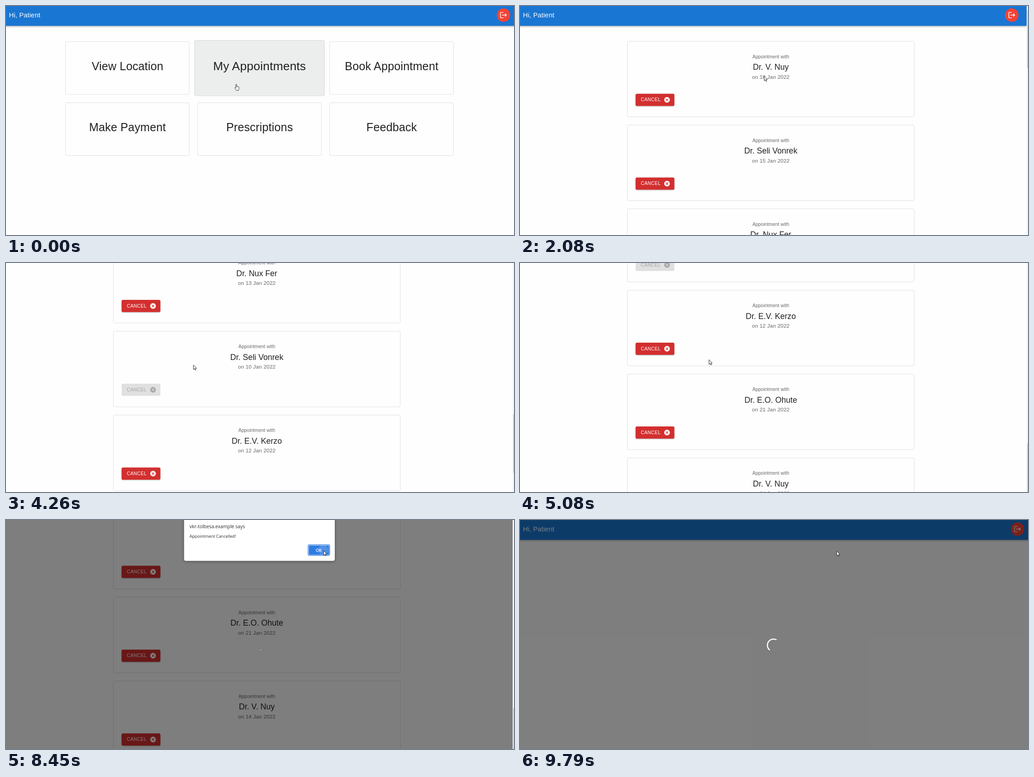
These frames come from a looping animation (1114x503 px, 9860 ms). An HTML page:

```html
<!DOCTYPE html>
<html lang="en">
<head>
<meta charset="utf-8">
<title>Patient appointments</title>
<style>
  html, body { margin: 0; width: 100%; height: 100%; overflow: hidden; background: #fefefe; }
  svg { display: block; position: absolute; left: 0; top: 0; }
  text { font-family: "Liberation Sans", Arial, sans-serif; fill: rgba(0,0,0,.87); white-space: pre; }
  .mid { text-anchor: middle; }
  .h4 { font-size: 24.93px; letter-spacing: .00735em; }
  .h5 { font-size: 17.6px; }
  .h6 { font-size: 14.67px; letter-spacing: .0075em; fill: #fff; }
  .label { font-size: 10.27px; letter-spacing: .01071em; fill: rgba(0,0,0,.6); }
  .date { font-size: 11.73px; letter-spacing: .00938em; fill: rgba(0,0,0,.6); }
  .btn { font-size: 10.27px; letter-spacing: .02857em; fill: #fff; }
  .off .btn, .off .icon { fill: rgba(0,0,0,.26); }
  .card { fill: #fefefe; stroke: rgba(0,0,0,.12); }
  .face { fill: #d32f2f; filter: drop-shadow(0 1.2px 1.2px rgba(0,0,0,.3)); }
  .off .face { fill: #e0e0e0; filter: none; }
  .icon { fill: #fff; }
  .bar { fill: #1976d2; filter: drop-shadow(0 1.5px 2.2px rgba(0,0,0,.4)); }
  .box { fill: #fff; filter: drop-shadow(0 1px 3px rgba(0,0,0,.4)); }
  #dialog text { font-family: "Open Sans", "Noto Sans", sans-serif; fill: #2a2b2e; }
  #dialog .ok { font-size: 9.2px; font-weight: 600; fill: #fff; }
</style>
</head>
<body>
<svg id="stage" width="1114" height="503" viewBox="0 0 1114 503">
  <defs>
    <path id="logout" d="m17 7-1.41 1.41L18.17 11H8v2h10.17l-2.58 2.58L17 17l5-5zM4 5h8V3H4c-1.1 0-2 .9-2 2v14c0 1.1.9 2 2 2h8v-2H4V5z"/>
    <path id="cross" d="M12 2C6.47 2 2 6.47 2 12s4.47 10 10 10 10-4.47 10-10S17.53 2 12 2zm5 13.59L15.59 17 12 13.41 8.41 17 7 15.59 10.59 12 7 8.41 8.41 7 12 10.59 15.59 7 17 8.41 13.41 12 17 15.59z"/>
    <clipPath id="btnClip"><rect x="253.5" y="115.2" width="85" height="26.7" rx="3"/></clipPath>
    <clipPath id="okClip"><rect x="664" y="56" width="44.5" height="20.5" rx="2"/></clipPath>
  </defs>
  <rect width="1114" height="503" fill="#fefefe"/>

  <g id="page">
    <g id="home"></g>
    <g id="list"></g>
    <g id="header">
      <rect class="bar" id="bar" x="-12" y="-10" width="1140" height="53.5"/>
      <text class="h6" x="6.5" y="25.4">Hi, Patient</text>
      <g id="exit">
        <circle cy="20" r="14.7" fill="#f44336"/>
        <use href="#logout" class="icon" transform="translate(-8.8 11.2) scale(.733)"/>
      </g>
    </g>
  </g>

  <g id="backdrop">
    <rect id="shade" width="1114" height="503" fill="#000" fill-opacity=".5"/>
    <g id="spin">
      <circle id="arc" r="20.2" fill="none" stroke="#fff" stroke-width="3.6" transform="scale(.6667)"/>
    </g>
  </g>

  <g id="scroll">
    <rect x="1111" width="3" height="503" fill="#f4f4f4"/>
    <rect id="thumb" x="1112.5" width="2" height="128" fill="#bdbdbd"/>
  </g>

  <g id="dialog">
    <rect class="box" x="390.5" y="-10" width="330.5" height="99.7" rx="4"/>
    <text x="402.5" y="18.3" font-size="10.4">vkr-tolbesa.example says</text>
    <text x="402.5" y="39.2" font-size="9.12">Appointment Cancelled!</text>
    <rect x="662.4" y="54.4" width="47.4" height="23.4" rx="3" fill="#fff" stroke="#4a8fe8" stroke-width="1.6"/>
    <rect x="664" y="56" width="44.5" height="20.5" rx="2" fill="#2f7ce0"/>
    <circle id="okRipple" cx="696" cy="66" r="11" fill="#fff" clip-path="url(#okClip)"/>
    <text class="ok mid" x="685.5" y="69.6">OK</text>
  </g>

  <g id="cursor" stroke-linejoin="round" fill="#fff" stroke="#1c1c1c" stroke-width=".9">
    <path id="arrow" d="M0 0V10L2.3 7.9 3.9 11.5 5.4 10.8 3.9 7.3H7Z"/>
    <path id="hand" transform="translate(-4.2 -.6)" d="M3.2 8.5V1.6a1 1 0 0 1 2 0V6c0-.9 1.6-.9 1.7 0 .2-.7 1.5-.6 1.6.3.3-.6 1.5-.4 1.5.6V10c0 1.6-.9 2-.9 4H4.2C4 12.3 2.3 11 1 8.9c-.5-.9.5-1.6 1.2-.9z"/>
  </g>
</svg>

<script>
const LOOP = 9860;
const OPEN_LIST = 430, LOADED = 1510, ALERT = 6848, CLOSED = 8520, RELOAD = 9390;
const PITCH = 184.1;
const el = id => document.getElementById(id);
const show = (id, on) => el(id).style.display = on ? "" : "none";
const clamp = v => Math.max(0, Math.min(1, v));
const ease = v => { v = clamp(v); return v * v * (3 - 2 * v); };

const menu = ["View Location", "My Appointments", "Book Appointment",
              "Make Payment", "Prescriptions", "Feedback"];
el("home").innerHTML = menu.map((name, i) => {
  const x = 130.5 + (i % 3) * 289.6, y = 78.3 + (i > 2 ? 134.1 : 0);
  const cx = x + 136, cy = y + 58;
  const hot = i === 1;
  const scale = hot ? `transform="translate(${cx} ${cy}) scale(1.05) translate(${-cx} ${-cy})"` : "";
  return `<g ${scale}>
    <rect class="card" x="${x}" y="${y}" width="271.5" height="116" rx="3" ${hot ? 'style="fill:#eceeee"' : ""}/>
    <text class="h4 mid" x="${cx}" y="${y + 62.4}">${name}</text></g>`;
}).join("");

// name, day in January, whether the button is disabled
const visits = [
  ["V. Nuy", 18], ["Seli Vonrek", 15], ["Nux Fer", 14], ["E.O. Ohute", 17],
  ["V. Nuy", 11, true], ["E.V. Kerzo", 10, true], ["K. Pontre", 10, true], ["Nux Fer", 13],
  ["Seli Vonrek", 10, true], ["E.V. Kerzo", 12], ["E.O. Ohute", 21], ["V. Nuy", 14]
];
el("list").innerHTML = visits.map(([name, day, off], i) =>
  `<g class="${off ? "off" : ""}" transform="translate(0 ${77.5 + i * PITCH})">
    <rect class="card" x="235.5" width="629" height="166" rx="3"/>
    <text class="label mid" x="550" y="37">Appointment with</text>
    <text class="h5 mid" x="550" y="62.8">Dr. ${name}</text>
    <text class="date mid" x="550" y="82">on ${day} Jan 2022</text>
    <rect class="face" x="253.5" y="115.2" width="85" height="26.7" rx="3"/>
    ${i === 10 ? '<g clip-path="url(#btnClip)"><circle id="ripple" cx="304" cy="128.5" fill="#fff"/></g>' : ""}
    <text class="btn" x="265" y="131.9">CANCEL</text>
    <use href="#cross" class="icon" transform="translate(315.1 121.2) scale(.611)"/>
  </g>`).join("");

const scrollKeys = [[2250, 0], [2450, 90], [3510, 1021.6], [4070, 1400], [4260, 1400],
                    [5080, 1673.5], [5150, 1749]];
const cursorKeys = [[0, 505, 172], [700, 505, 172], [1500, 533, 156], [1710, 535, 154.5],
  [2080, 536, 154], [2400, 411, 224], [4070, 411, 224], [4260, 411, 224], [5080, 414.5, 212.5],
  [5270, 415, 213], [5950, 306, 296], [6210, 304, 296.5], [6330, 397.5, 269.5], [6700, 540, 185],
  [7210, 640, 115], [8100, 697, 67], [8450, 696.5, 67.5], [9390, 696.5, 67.5], [9700, 694.5, 68.5]];

function at(keys, t, col) {
  const n = keys.findIndex(k => k[0] > t);
  if (n === 0) return keys[0][col];
  if (n < 0) return keys[keys.length - 1][col];
  const a = keys[n - 1], b = keys[n];
  return a[col] + (b[col] - a[col]) * (t - a[0]) / (b[0] - a[0]);
}

function shadeLevel(t) {
  if (t >= RELOAD) return ease((t - RELOAD + 20) / 200);
  if (t >= 6180) return t < 8470 ? ease((t - 6180) / 180) : 1 - ease((t - 8470) / 190);
  return t < LOADED ? ease((t - OPEN_LIST + 20) / 200) : 1 - ease((t - LOADED) / 195);
}

// The ring turns steadily while its dash grows, then shrinks; an open alert holds the dash.
function drawSpinner(t) {
  const start = t >= RELOAD ? 9395 : t > 6000 ? 5448 : OPEN_LIST;
  const phase = s => (((s - start) / 1400) % 1 + 1) % 1;
  const held = t > ALERT && t < RELOAD ? ALERT - 6 : t;
  const p = phase(held), grow = ease(p * 2), shrink = ease(p * 2 - 1);
  el("arc").setAttribute("stroke-dasharray", `${1 + 99 * grow} 200`);
  el("arc").setAttribute("stroke-dashoffset", -15 * grow - 110 * shrink);
  const wide = t < LOADED || t >= RELOAD;
  el("spin").setAttribute("transform", `translate(${wide ? 556 : 550} 275) rotate(${phase(t) * 360})`);
}

function draw(t) {
  const home = t < OPEN_LIST, list = t >= LOADED && t < RELOAD;
  const top = list ? at(scrollKeys, t, 1) : 0;
  show("home", home);
  show("list", list);
  show("scroll", list);
  el("page").setAttribute("transform", `translate(0 ${-top})`);
  el("bar").setAttribute("width", list ? 1123 : 1140);
  el("exit").setAttribute("transform", `translate(${list ? 1078.5 : 1091} 0)`);
  el("thumb").setAttribute("y", 9 + top / 4.33);

  const level = shadeLevel(t);
  show("backdrop", level > 0);
  el("backdrop").setAttribute("opacity", level);
  el("shade").setAttribute("width", list ? 1111 : 1114);
  drawSpinner(t);

  el("ripple").setAttribute("r", 100 * clamp((t - 6150) / 550));
  el("ripple").setAttribute("opacity", t < 6150 ? 0 : .3 * (1 - clamp((t - 6350) / 450)));

  show("dialog", t >= ALERT && t < CLOSED);
  el("okRipple").setAttribute("opacity", .16 * clamp((t - 8310) / 100));

  const hand = t < OPEN_LIST || (t > 5790 && t < 6240);
  show("hand", hand);
  show("arrow", !hand);
  el("cursor").setAttribute("transform", `translate(${at(cursorKeys, t, 1)} ${at(cursorKeys, t, 2)})`);
}

const born = performance.now();
function tick() {
  draw((performance.now() - born) % LOOP);
  requestAnimationFrame(tick);
}
tick();
</script>
</body>
</html>
```
